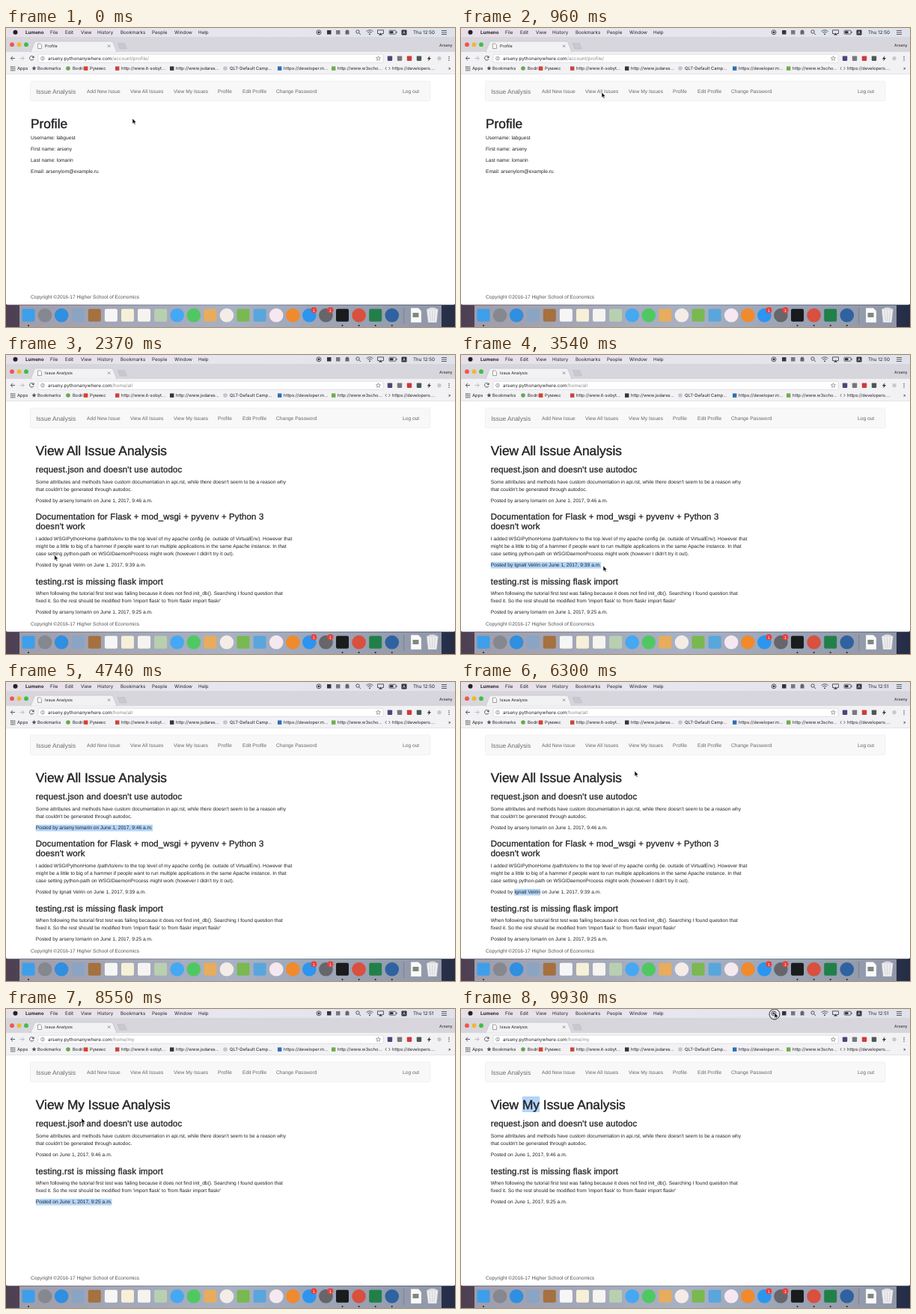
An HTML page that plays this animation: 600 by 400 pixels, repeating every 9960 ms.

```html
<!DOCTYPE html>
<html lang="en">
<head>
<meta charset="utf-8">
<title>Issue Analysis</title>
<style>
html, body { margin: 0; width: 100%; height: 100%; overflow: hidden; background: #fff; }
svg { display: block; width: 600px; height: 400px; }
text { font-family: "Liberation Sans", Arial, sans-serif; font-size: 6.67px; fill: #222226; white-space: pre; text-rendering: geometricPrecision; }
.h1 { font-size: 17.35px; stroke: #222226; stroke-width: .4px; }
.h3 { font-size: 11.43px; letter-spacing: .17px; stroke: #222226; stroke-width: .3px; }
.brand { font-size: 8.33px; fill: #6c6c70; }
.nav { fill: #66666a; }
.foot { fill: #55555a; }
.menu, .url, .tab, .mark, .user { font-family: Inter, Roboto, sans-serif; }
.menu { font-size: 6.25px; }
.bold { font-weight: 700; }
.url { font-size: 6.25px; }
.tab { font-size: 5.5px; }
.mark { font-size: 5.9px; }
.user { font-size: 5.3px; }
.badge { font-size: 5.5px; fill: #fff; text-anchor: middle; }
</style>
</head>
<body>
<svg id="stage" viewBox="0 0 600 400" xmlns="http://www.w3.org/2000/svg"></svg>
<script>
const LOOP = 9960;
const INK = '#333338';
const stage = document.getElementById('stage');

const rect = (x, y, w, h, fill, more = '') => `<rect x="${x}" y="${y}" width="${w}" height="${h}" fill="${fill}" ${more}/>`;
const disc = (x, y, r, fill, more = '') => `<circle cx="${x}" cy="${y}" r="${r}" fill="${fill}" ${more}/>`;
const line = (d, color = '#4a4a50', width = .9) => `<path d="${d}" fill="none" stroke="${color}" stroke-width="${width}"/>`;
const shape = (d, fill, more = '') => `<path d="${d}" fill="${fill}" ${more}/>`;
const text = (cls, x, y, s, id = '') => `<text class="${cls}" x="${x}" y="${y}" ${id && `id="${id}"`}>${s}</text>`;
const fade = (id, ...stops) => `<linearGradient id="${id}">${stops.map((c, i) => `<stop offset="${i / (stops.length - 1)}" stop-color="${c}"/>`).join('')}</linearGradient>`;

const star = (x, y, r) => 'M' + Array.from({ length: 10 }, (_, i) => {
  const a = i * Math.PI / 5 - Math.PI / 2, q = i % 2 ? r * .45 : r;
  return (x + q * Math.cos(a)).toFixed(2) + ' ' + (y + q * Math.sin(a)).toFixed(2);
}).join('L') + 'Z';

function menuBar() {
  const items = [[59, 'File'], [79, 'Edit'], [100, 'View'], [122, 'History'], [153, 'Bookmarks'], [195, 'People'], [225, 'Window'], [257, 'Help']];
  return rect(0, 0, 600, 11.5, 'url(#bar)') + disc(12.5, 5.7, 3, '#222226')
    + text('menu bold', 26, 7.9, 'Lumeno')
    + items.map(([x, s]) => text('menu', x, 7.9, s)).join('')
    + disc(418, 5.8, 3, 'none', `stroke="${INK}" stroke-width=".8"`) + disc(418, 5.8, 1.5, INK)
    + rect(429, 3, 5.5, 5.5, INK) + rect(441, 3, 5.5, 5.5, '#77777c')
    + shape('M453.5 8.5V5a2.5 2.5 0 0 1 5 0v3.5z', '#66666a')
    + disc(470, 5, 2.2, 'none', `stroke="${INK}" stroke-width=".8"`) + line('M471.7 6.7L474 9')
    + line('M481.5 4.5Q486 1 490.5 4.5M483.2 6.2Q486 4 488.8 6.2') + disc(486, 8.2, .9, INK)
    + line('M499 7.5H496.5V2.8H504.5V7.5H502') + shape('M498 9.5L500.5 6.5L503 9.5Z', INK)
    + rect(512, 3.2, 9, 5, 'none', `stroke="${INK}" stroke-width=".7" rx="1"`) + rect(513, 4.2, 4.5, 3, INK) + rect(521.5, 4.7, 1, 2, INK)
    + rect(528.5, 2.4, 7, 7, INK, 'rx="1"') + `<text class="menu" x="530" y="8" style="font-size:5.5px;fill:#f0f0f4">A</text>`
    + text('menu', 544, 7.9, '', 'clock')
    + line('M582 3.5H589M582 6H589M582 8.5H589');
}

function browser() {
  const marks = [
    [15, 'Apps'], [42, 'Bookmarks', '#55555a'], [89, 'Bodri', '#6aa84f', 1], [112, 'Румикс', '#d8402f'],
    [154, 'http://www.it-sobyt...', '#c8453a'], [227, 'http://www.jsdares...', INK],
    [299, 'QLT-Default Camp...', '#c4c4cc', 1], [371, 'https://developer.m...', '#2f6fae'],
    [443, 'http://www.w3scho...', '#6fae4a'], [516, 'https://developers....', '']
  ];
  const tools = [[513, '#54407a'], [526, '#77777c'], [539, '#cf3a3a'], [552, '#4a5a50']];
  let s = rect(0, 11.5, 600, 21, '#d7d6dc') + rect(0, 32, 600, 30, '#f2f2f5')
    + shape('M33 32.2L38 19.5Q38.6 18 40 18H141Q142.5 18 143 19.5L148 32.2Z', '#f2f2f5', 'stroke="#b4b4bc" stroke-width=".5"')
    + rect(33.5, 31.9, 114, 1, '#f2f2f5')
    + shape('M149 20.5H158.5L161.5 28H152Z', '#c9c8d0', 'stroke="#b0b0b8" stroke-width=".4"')
    + ['#f0554e', '#f2b632', '#3fbe45'].map((c, i) => disc(8 + i * 9.5, 22.2, 2.9, c)).join('')
    + shape('M42.5 21H45.8L47.5 22.7V27.5H42.5Z', '#fff', 'stroke="#66666a" stroke-width=".6"')
    + text('tab', 52, 26, '', 'tab') + line('M136 22.5L139.2 25.7M139.2 22.5L136 25.7', '#66666a', .7)
    + text('user', 579, 24.6, 'Arseny')
    + line('M12 40.5H6.5M9 37.8L6.3 40.5L9 43.2')
    + line('M18.5 40.5H24M21.5 37.8L24.2 40.5L21.5 43.2', '#b5b5bc')
    + line('M36.8 38.9A2.8 2.8 0 1 0 37 41.2') + shape('M37.5 37V40H34.5Z', '#4a4a50')
    + rect(43, 35.2, 461, 11, '#fff', 'rx="1.5" stroke="#c6c6cc" stroke-width=".5"')
    + disc(49, 40.7, 2.4, 'none', 'stroke="#66666a" stroke-width=".6"') + rect(48.7, 40.2, .7, 2, '#66666a') + rect(48.7, 39, .7, .7, '#66666a')
    + `<text class="url" x="56" y="43">arseny.pythonanywhere.com<tspan id="path" fill="#88888c"></tspan></text>`
    + shape(star(497.5, 40.8, 3.2), 'none', 'stroke="#66666a" stroke-width=".6"')
    + tools.map(([x, c]) => rect(x - 3.2, 37.5, 6.4, 6.4, c, 'rx=".8"')).join('')
    + shape('M566.5 37L562.8 41.5H565L564.2 44.5L568 40H565.6Z', INK)
    + disc(579, 40.7, 2.6, '#c8c8cc')
    + [38.4, 40.8, 43.2].map(y => disc(592, y, .75, '#55555a')).join('');

  const dots = ['#d8503f', '#4a90d9', '#55a555'];
  for (let i = 0; i < 9; i++) s += rect(6 + i % 3 * 2.3, 51.2 + (i / 3 | 0) * 2.3, 1.7, 1.7, dots[(i + (i / 3 | 0)) % 3]);
  for (const [x, label, color, round] of marks) {
    s += text('mark', x, 56.4, label);
    if (label === 'Bookmarks') s += shape(star(37.5, 54, 3.2), color);
    else if (color) s += round ? disc(x - 6, 54, 2.8, color) : rect(x - 8, 51.4, 5.4, 5.4, color);
  }
  return s + line('M508.5 52L506.8 54L508.5 56M511.5 52L513.2 54L511.5 56', '#4a4a50', .7)
    + text('mark', 591, 56.4, '»') + rect(0, 61.5, 600, .5, '#d4d4d8');
}

function site() {
  const links = [[108, 'Add New Issue'], [166, 'View All Issues'], [224, 'View My Issues'], [283, 'Profile'], [316, 'Edit Profile'], [361, 'Change Password'], [530, 'Log out']];
  return rect(32.5, 71, 534.5, 26.5, '#f8f8f8', 'rx="1.8" stroke="#e7e7e7" stroke-width=".5"')
    + text('brand', 40.3, 87.6, 'Issue Analysis')
    + links.map(([x, s]) => text('nav', x, 87, s)).join('')
    + text('foot', 33, 362.3, 'Copyright ©2016-17 Higher School of Economics');
}

function dock() {
  // shape and colour, left to right
  const apps = ['s#3d9fea', 'c#85888e', 'c#2f8fe0', 's#8aa4c4', 's#a5713f', 's#f6f6f6', 's#f6f0d8', 's#f6f4f0', 's#b9d0b0', 'c#45a8f2', 'c#50c862',
    's#e8ac5c', 'c#f4ece6', 's#7ab850', 's#58a6dc', 'c#f6e8f0', 'c#f08a2c', 'c#2b95f0', 'c#66666a', 's#1a1b1c', 'c#d9503f', 's#21804a', 'c#2f62a0'];
  let s = rect(0, 366, 600, 34, 'url(#desk)') + rect(0, 362, 600, 8.3, '#fff', 'rx="2"')
    + rect(18, 371, 564, 29, '#d4dae6', 'opacity=".6"');
  apps.forEach((a, i) => {
    const x = 30 + i * 22.08, c = a.slice(1);
    s += a[0] === 'c' ? disc(x, 384.3, 9.3, c) : rect(x - 8.5, 375.8, 17, 17, c, 'rx="2"');
    if ([0, 19, 20, 21, 22].includes(i)) s += disc(x, 398, 1, '#1c1c22');
    if (i === 17 || i === 18) s += disc(x + 6, 377.5, 4, '#ea3f3a') + text('badge', x + 6, 379.5, '1');
  });
  return s + rect(531.5, 374, .6, 22, '#6c7484')
    + shape('M541 374.5H551L555 378.5V394H541Z', '#fafafa', 'stroke="#b0b0b8" stroke-width=".4"') + rect(543.5, 381, 8, 6, '#7d8a80')
    + shape('M562 376H577.5L575.5 394H564Z', '#eeeef0', 'stroke="#a8a8b0" stroke-width=".5"')
    + line('M566 378L567.2 392M569.7 378V392M573.5 378L572.2 392', '#c0c0c8', .6)
    + shape('M563 376Q569.5 371.5 576.5 376Z', '#dcdce0');
}

const issue = (y, title, body) => [['h3', y, title], ...body.map((s, i) => ['p', y + 14.8 + i * 10.1, s])];
const jsonIssue = y => issue(y, "request.json and doesn't use autodoc", [
  "Some attributes and methods have custom documentation in api.rst, while there doesn't seem to be a reason why",
  "that couldn't be generated through autodoc."]);
const testIssue = y => issue(y, 'testing.rst is missing flask import', [
  'When following the tutorial first test was failing because it does not find init_db(). Searching I found question that',
  "fixed it. So the rest should be modified from 'import flask' to 'from flaskr import flaskr'"]);

const pages = [
  { from: 0, x: 33, tab: 'Profile', path: '/account/profile/', lines: [
    ['h1', 134, 'Profile'], ['p', 149.4, 'Username: labguest'], ['p', 164.4, 'First name: arseny'],
    ['p', 179.4, 'Last name: lomarin'], ['p', 194.3, 'Email: arsenylom@example.ru']] },
  { from: 1170, x: 39.8, tab: 'Issue Analysis', path: '/home/all', lines: [
    ['h1', 134, 'View All Issue Analysis'], ...jsonIssue(157.4),
    ['p', 197.4, 'Posted by arseny lomarin on June 1, 2017, 9:46 a.m.'],
    ['h3', 220.2, 'Documentation for Flask + mod_wsgi + pyvenv + Python 3'],
    ...issue(233.2, "doesn't work", [
      'I added WSGIPythonHome /path/to/env to the top level of my apache config (ie. outside of VirtualEnv). However that',
      'might be a little to big of a hammer if people want to run multiple applications in the same Apache instance. In that',
      "case setting python-path on WSGIDaemonProcess might work (however I didn't try it out)."]),
    ['p', 283.3, 'Posted by Ignati Velrin on June 1, 2017, 9:39 a.m.'],
    ...testIssue(306.5),
    ['p', 346, 'Posted by arseny lomarin on June 1, 2017, 9:25 a.m.']] },
  { from: 6960, x: 39.8, tab: 'Issue Analysis', path: '/home/my', lines: [
    ['h1', 134, 'View My Issue Analysis'], ...jsonIssue(157.4), ['p', 197.4, 'Posted on June 1, 2017, 9:46 a.m.'],
    ...testIssue(220.5), ['p', 260.4, 'Posted on June 1, 2017, 9:25 a.m.']] }
];

stage.innerHTML = `<defs>${fade('desk', '#4e3f52', '#66748f', '#252c46')}${fade('bar', '#e8dfe8', '#e6e6ee', '#dfe2ea')}</defs>`
  + rect(0, 0, 600, 400, '#fff') + dock() + menuBar() + browser() + site()
  + rect(0, 0, 0, 0, '#b3d5f8', 'id="mark"')
  + pages.map(p => `<g class="page">${p.lines.map(([c, y, s]) => text(c, p.x, y, s)).join('')}</g>`).join('')
  + disc(419, 7, 7, 'none', `id="ring" stroke="${INK}" stroke-width="1"`)
  + `<g id="cursor"><path id="arrow" d="M0 0V7.2L1.7 5.7L2.9 8.3L4.1 7.8L2.9 5.2H5.2Z" fill="#111" stroke="#fff" stroke-width=".5"/>`
  + `<path id="beam" d="M-1.5 -4Q0 -4 0 -3V3Q0 4 -1.5 4M1.5 -4Q0 -4 0 -3V3Q0 4 1.5 4" fill="none" stroke="#222" stroke-width=".7"/></g>`;

const $ = id => document.getElementById(id);
const groups = [...document.querySelectorAll('.page')];
const show = (node, on) => node.setAttribute('visibility', on ? 'visible' : 'hidden');

// pointer path: time, x, y
const route = [
  [0, 169, 121], [350, 169, 121], [850, 188, 86], [1180, 188, 86], [1770, 225, 180], [2550, 40, 281], [2700, 40, 281],
  [3350, 190, 282], [3600, 190, 282], [3850, 191, 195], [3950, 191, 195], [4400, 40, 195], [4740, 84, 127],
  [5200, 71, 281], [5300, 71, 281], [5650, 107, 281], [5850, 107, 281], [6300, 232, 119], [6600, 246, 86], [6980, 246, 86],
  [7500, 142, 258], [7600, 142, 258], [8150, 40, 258], [8250, 40, 258], [8550, 101, 146], [8800, 94, 128], [9100, 94, 128], [9650, 419, 5], [LOOP, 419, 5]
];

// selections: start, drag end, cleared, page, words, drag direction
const picks = [
  [2700, 3350, 3930, 1, 'Posted by Ignati Velrin on June 1, 2017, 9:39 a.m.', 1],
  [3950, 4400, 5280, 1, 'Posted by arseny lomarin on June 1, 2017, 9:46 a.m.', -1],
  [5300, 5650, 6960, 1, 'Ignati Velrin', 1],
  [7600, 8150, 8880, 2, 'Posted on June 1, 2017, 9:25 a.m.', -1],
  [8900, 8900, LOOP, 2, 'My', 0]
].map(([start, end, stop, page, words, dir]) => {
  const node = [...groups[page].children].find(n => n.textContent.includes(words));
  const first = node.textContent.indexOf(words);
  const left = node.getStartPositionOfChar(first).x;
  const right = node.getEndPositionOfChar(first + words.length - 1).x;
  const big = node.classList.contains('h1');
  return { start, end, stop, dir, left, right, top: node.getAttribute('y') - (big ? 17 : 6.5), height: big ? 21 : 8.7 };
});

function pointer(t) {
  const i = Math.max(1, route.findIndex(k => k[0] > t));
  const [t0, x0, y0] = route[i - 1], [t1, x1, y1] = route[i];
  const u = (t - t0) / (t1 - t0), e = u * u * (3 - 2 * u);
  return [x0 + (x1 - x0) * e, y0 + (y1 - y0) * e];
}

function draw(t) {
  const now = pages.findLastIndex(p => t >= p.from);
  groups.forEach((g, i) => show(g, i === now));
  $('tab').textContent = pages[now].tab;
  $('path').textContent = pages[now].path;
  $('clock').textContent = t < 5500 ? 'Thu 12:50' : 'Thu 12:51';

  const [x, y] = pointer(t);
  const pick = picks.find(p => t >= p.start && t < p.stop);
  const mark = $('mark');
  show(mark, pick);
  if (pick) {
    let { left, right } = pick;
    if (t < pick.end && pick.dir > 0) right = Math.max(left, Math.min(right, x));
    if (t < pick.end && pick.dir < 0) left = Math.min(right, Math.max(left, x));
    for (const [k, v] of Object.entries({ x: left, y: pick.top, width: right - left, height: pick.height })) mark.setAttribute(k, v);
  }

  const typing = (pick && t < pick.end) || (t > 4640 && t < 4850) || (t > 5150 && t < 5850) || (t > 8700 && t < 9150);
  show($('arrow'), !typing);
  show($('beam'), typing);
  $('cursor').setAttribute('transform', `translate(${x.toFixed(2)} ${y.toFixed(2)})`);
  show($('ring'), t >= 9750);
}

const begin = performance.now();
function tick(now) {
  draw(Math.max(0, now - begin) % LOOP);
  requestAnimationFrame(tick);
}
draw(0);
requestAnimationFrame(tick);
</script>
</body>
</html>
```
